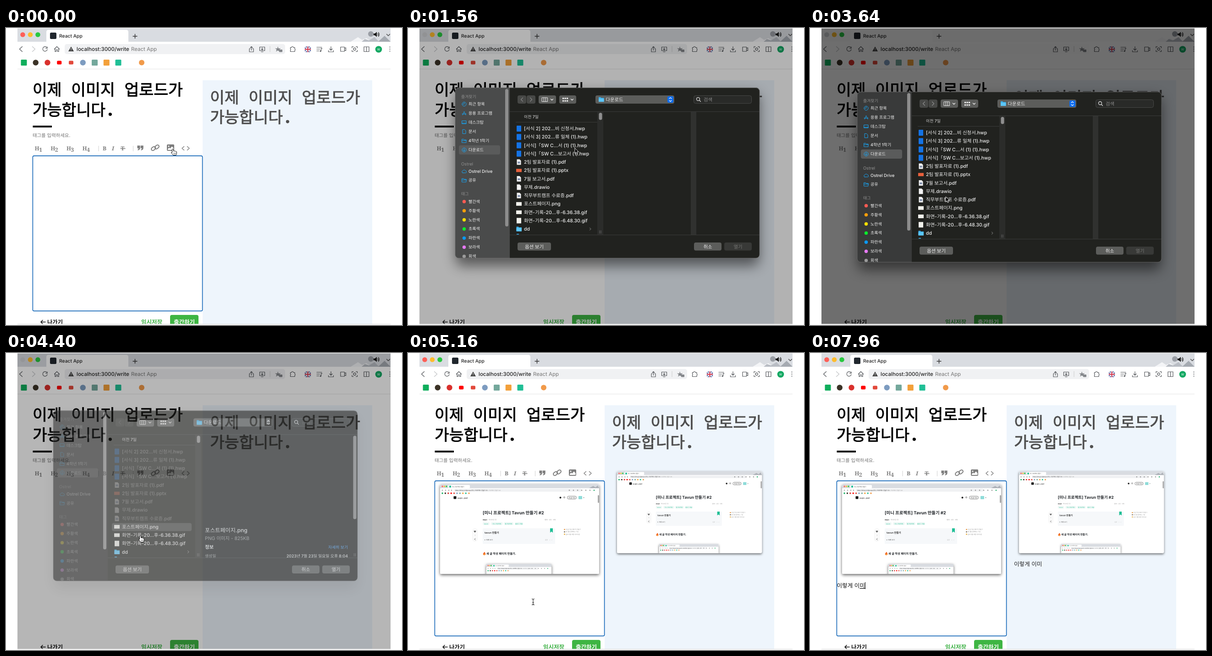
An HTML page for the animation above (8 s loop, 864 by 648 pixels).

```html
<!DOCTYPE html>
<html lang="ko">
<head>
<meta charset="utf-8">
<title>Image upload in the editor</title>
<style>
html, body { margin: 0; width: 100%; height: 100%; overflow: hidden; background: #fff; }
svg { display: block; }
text { font-family: Inter, "Noto Sans CJK KR", "Noto Sans CJK", sans-serif; white-space: pre; text-rendering: geometricPrecision; }
.ko text, text.ko { font-family: "Noto Sans CJK KR", "Noto Sans CJK", sans-serif; }
text.title { font-family: "Noto Sans Mono", "Noto Sans CJK KR", "Noto Sans CJK", monospace; stroke-width: .9px; }
.title .dot { font-weight: 700; }
.slab text { font-family: "Noto Serif", serif; font-weight: 600; }
.line { fill: none; stroke-linecap: round; stroke-linejoin: round; }
</style>
</head>
<body>
<svg id="stage" width="864" height="648" viewBox="0 0 864 648"></svg>
<script>
const rect = (x, y, w, h, fill, r = 0, more = '') =>
  `<rect x="${x}" y="${y}" width="${w}" height="${h}" rx="${r}" fill="${fill}" ${more}/>`;
const dot = (x, y, r, fill, more = '') => `<circle cx="${x}" cy="${y}" r="${r}" fill="${fill}" ${more}/>`;
const text = (x, y, s, size, fill, more = '') =>
  `<text x="${x}" y="${y}" font-size="${size}" fill="${fill}" ${more}>${s}</text>`;
const line = (d, color, w = 1.2, more = '') =>
  `<path class="line" d="${d}" stroke="${color}" stroke-width="${w}" ${more}/>`;
const shape = (d, fill, more = '') => `<path d="${d}" fill="${fill}" ${more}/>`;
const bold = 'font-weight="700"', semi = 'font-weight="600"', mid = 'text-anchor="middle"', end = 'text-anchor="end"';
const lights = ['#fe5f57', '#febc2e', '#28c840'];
const marks = ['#0fae5c', '#3b3226', '#d9302c', '#f00', '#e2493b', '#7d9cc0', '#74a89c', '#f3a03a', '#20bf96'];

function browser() {
  const ink = '#55585c';
  return rect(25, 1, 814, 645, '#fff') + rect(25, 1, 814, 29, '#d9dce1') +
    rect(25, 1, 814, 29, '#fff', 0, 'id="stripFade"') +
    shape('M752 30L768 20L777 26L786 22L798 30Z', '#f4f5f7') +
    shape('M776 30L783 24L792 27L804 20L814 30Z', '#b9bdc4') +
    shape('M812 30L826 17L839 30Z', '#a5aab1') + dot(796, 13, 6, '#9a9ea5') +
    shape('M88 30V9Q88 4 93 4H262Q267 4 267 9V30Z', '#fff') +
    lights.map((c, i) => dot(36.5 + i * 16.5, 14.5, 5.3, c, i ? '' : 'id="closeDot"')).join('') +
    rect(96, 10, 14, 14, '#20262d', 2.5) + text(116, 21, 'React App', 10.3, '#222', 'font-weight="500"') +
    line('M277 18H286M281.500 13.500V22.500', '#333', 1.4) +
    shape('M802 12H805L809 8.500V19.500L805 16H802Z', '#111') + line('M811 11.500Q813 14 811 16.500M812.500 9.500Q816 14 812.500 18.500', '#111', 1.1) +
    line('M830.500 13.500L834 17L837.500 13.500', '#444', 1.3) +
    // toolbar
    line('M35.500 40.500L29.500 46L35.500 51.500', ink) + line('M57.500 40.500L63.500 46L57.500 51.500', '#c3c5c8') +
    line('M89 42.500A5 5 0 1 0 90 47M90 41V44.500H86.500', ink) +
    line('M105.500 46L111 40.500L116.500 46M107 45V51.500H109.500V47.500H112.500V51.500H115V45', ink) +
    rect(128, 35, 481, 22, '#f0f1f3', 5, 'id="pill"') +
    shape('M142 40.500L148 51H136Z', '#444') + line('M142 44.500V47M142 49V49.100', '#fff', 1.1) +
    text(154, 50, 'localhost:3000/write', 11.5, '#222', 'font-weight="500"') + text(273, 50, 'React App', 11.5, '#777') +
    line('M533 45H531V52H540V45H538M535.500 48.500V40.500M533 43L535.500 40.500L538 43', ink) +
    line('M553.500 41.500H564.500V49.500H553.500ZM557 52H561M559 43V47.500M557 46L559 48L561 46', ink) +
    line('M576 40V52', '#ccc', 1) +
    shape('M593 40L594.500 44.500H599.500L596 47.500L597 51.500L593 49L589 51.500L590.500 47L587 44.500H592Z', '#85888c') + rect(596, 47, 7, 5.500, '#85888c', 1) +
    line('M620.500 42.500H623A2 2 0 0 1 627 42.500H630V45.500A2 2 0 0 1 630 49V51.500H620.500V48.500A2 2 0 0 0 620.500 45.500Z', ink) +
    rect(652, 40.500, 13, 12, '#27408f') + line('M652 40.500L665 52.500M665 40.500L652 52.500', '#fff', 2) +
    line('M658.500 41V52M652.500 46.500H664.500', '#fff', 3.6) + line('M658.500 41V52M652.500 46.500H664.500', '#d02840', 1.8) +
    line('M678 42H689M678 46H684.500M678 50H683M687.500 50V44L690 45', ink) + dot(686.3, 50.3, 1.6, ink) +
    line('M709 40.500V48M706 45.500L709 48.500L712 45.500M703.500 49V52H714.500V49', ink) +
    line('M730 41.500H738.500V51H730ZM738.500 44.500L741.500 43V49.500L738.500 48', ink) +
    line('M755 43.500V40.500H758M763.500 40.500H766.500V43.500M766.500 48.500V51.500H763.500M758 51.500H755V48.500', ink) + dot(760.7, 46, 2.6, 'none', `stroke="${ink}" stroke-width="1.2"`) +
    line('M781 41H792V51.500H781ZM786.500 41V51.500', ink) +
    dot(813, 46.500, 7.300, '#12a862') + text(813, 49, 'W', 6.500, '#fff', mid) +
    [41.5, 46, 50.5].map(y => dot(837.5, y, 1, ink)).join('') +
    // bookmarks
    marks.map((c, i) => {
      const x = 39 + i * 25.75;
      return [1, 2, 5].includes(i) ? dot(x, 75.5, 6.2, c) : i == 3 || i == 4 ? rect(x - 5, 71.500, 10, 8, c, 2) : rect(x - 6.5, 69, 13, 13, c, 1.5);
    }).join('') + dot(296, 75.5, 6, '#f19a4a') + rect(25, 89, 814, 1, '#e4e4e4');
}

const heading = (x, y, c) => ['이제 이미지 업로드가', '가능합니다<tspan class="dot">.</tspan>']
  .map((s, i) => text(x, y + i * 43.6, s, 34.6, c, `class="title" stroke="${c}"`)).join('');

function page() {
  const g = '#7d7d7d', b = 'class="ko" ' + bold;
  return heading(58, 147, '#000') + rect(58.5, 213, 41.5, 4, '#000') +
    text(58, 238, '태그를 입력하세요.', 10.4, '#757575', 'class="ko"') +
    '<g class="slab">' + [1, 2, 3, 4].map(n => text(28 + n * 34.7, 267, 'H', 12, g) + text(37.5 + n * 34.7, 270, n, 12, g)).join('') +
    text(211, 267, 'B', 12, g) + text(231, 267, 'I', 12, g, 'font-style="italic"') + text(250.500, 267, 'T', 12, g) + '</g>' +
    line('M250 263H260', g, 1.3) + line('M202 257.500V268.500M277.500 257.500V268.500', '#cfcfcf', 1) +
    [286.5, 293.7].map(x => shape(`M${x} 256.500h6v5q0 4.500 -5 5.500v-2q2 -.8 2 -2.500h-3z`, g)).join('') +
    [[321.7, 263], [329.300, 259.500]].map(([x, y]) =>
      rect(x - 5, y - 3.2, 10, 6.4, 'none', 3.2, `stroke="${g}" stroke-width="1.9" transform="rotate(-38 ${x} ${y})"`)).join('') +
    rect(351, 254, 16, 14, g, 2) + dot(355, 258, 1.5, '#fff') + shape('M353 266V264L356 261L358 263L362 258.500L365.500 262V266Z', '#fff') +
    line('M388.500 258.500L384 262.500L388.500 266.500M395.500 258.500L400 262.500L395.500 266.500', g, 1.5) +
    rect(429, 114, 370, 532, '#eef5fc') + heading(445, 163.5, '#4f4f4f') +
    rect(58.4, 278.9, 370.2, 338.5, 'none', 3, 'id="focus" stroke="#1467b8" stroke-width="1.6"') +
    line('M86 641.500H76M80 637.500L76 641.500L80 645.500', '#111', 1.6) + text(90, 645.5, '나가기', 12.3, '#111', b) +
    text(295, 645.5, '임시저장', 12.5, '#3bb043', b) + rect(358, 626, 62, 30, '#3eb543', 4) +
    text(366, 645.5, '출간하기', 12.5, '#fff', b);
}

// Small browser bar used inside the uploaded screenshot
const miniBar = (w, k) => `<g transform="scale(${k})">` + rect(0, 0, w / k, 9, '#d9dce1') + rect(18, 2, 47, 7, '#fff', 1.5) +
  lights.map((c, i) => dot(5 + i * 4.4, 5, 1.7, c)).join('') + rect(20, 3.5, 4, 4, '#20bf96') +
  text(26, 7, '미니 프로젝트 만들기', 3, '#333') + rect(31, 10.500, w / k - 70, 6, '#f0f1f3', 1.5) +
  text(33, 14.700, 'https://blog.io/@wupo/미니-프로젝트-만들기-2', 3.3, '#333') + text(100, 14.700, '미니 프로젝트 만들기 #2', 3.1, '#999') +
  [5, 12, 19, 25].map(x => dot(x, 13.5, 1.300, '#aaa')).join('') +
  [0, 1, 2, 3, 4, 5, 6].map(i => dot(w / k - 65 + i * 9, 13.5, 1.3, i == 6 ? '#12a862' : '#999')).join('') +
  marks.map((c, i) => dot(5 + i * 6.4, 20, 1.7, c)).join('') + dot(63, 20, 1.7, '#f19a4a') + '</g>';

function shot() {
  const teal = '#20bf96', tags = [[93, 15, 'tavun'], [111, 26, '미니 프로젝트'], [139, 21, '웹 프로젝트'], [163, 18, '블로그 개발']];
  return rect(0, 0, 347, 196, '#fff', 3, 'filter="url(#cast)"') + '<g clip-path="url(#shotClip)">' + rect(0, 0, 347, 196, '#fff') +
    miniBar(347, 1) + shape('M325 9L334 4L339 7L344 3L347 9Z', '#aeb2b9') + rect(344, 24, 3, 17, '#aaa', 1.5) +
    rect(29.5, 26.5, 6, 6, '#111', 1) + text(38, 31.500, 'wupo.pad', 4.6, '#222', 'style="font-family:\'DejaVu Sans Mono\',monospace"') +
    dot(262.5, 29.5, 2, '#222') + dot(271, 29, 1.5, 'none', 'stroke="#333" stroke-width=".6"') +
    rect(277.500, 26.300, 20, 6.400, '#fff', 3.2, 'stroke="#333" stroke-width=".6"') + text(287.500, 31, '새 글 작성', 3.5, '#222', mid) +
    rect(302, 26, 8, 7, '#8fdcd9', 1) + shape('M312 29H315L313.500 30.500Z', '#777') +
    text(93, 65.5, '[미니 프로젝트] Tavun 만들기 #2', 9.4, '#212529', bold) +
    text(93, 78.7, 'wupo', 3.6, '#222', bold) + text(104, 78.7, '· 약 6시간 전', 3.5, '#888') + text(252, 78.7, '통계 · 수정 · 삭제', 3.3, '#888', end) +
    tags.map(([x, w, s]) => rect(x, 83, w, 6.5, '#f0f8f6', 3) + text(x + w / 2, 87.5, s, 3.3, teal, mid)).join('') +
    rect(93, 96.5, 158, 34, '#f6f8fa', 1.5) + text(97, 108, 'tavun 만들기', 5.5, '#333', semi) +
    shape('M240 96.500H246V106L243 103.500L240 106Z', teal) + text(97, 123, '▾  목록 보기', 3.6, '#444') + text(229, 123, '2/2    ‹   ›', 3.6, '#aaa') +
    rect(70.5, 97, 11, 28, '#fafafa', 5.5, 'stroke="#eee" stroke-width=".6"') +
    shape('M76 106L73.500 103Q73.500 100.500 76 102Q78.500 100.500 78.500 103Z', '#666') + text(76, 112.500, '1', 3, '#777', mid) +
    line('M77.500 118.500L74.500 120.300L77.500 122', '#666', .7) +
    ['#e58a2c', '#6b5a4a', '#e5a52c'].map((c, i) => dot(271.500, 99 + i * 5.2, 1.3, c) + text(274, 100.2 + i * 5.2, ['새 글 작성 페이지 만들기', '태그를 입력하는 기능', '글쓰기를 위한 마크다운'][i], 3.2, '#888')).join('') +
    shape('M96.500 147.500Q100 151 99 154Q96.500 156.500 94 154Q93 151.500 95 150Q96.500 149 96.500 147.500Z', '#f0672a') + dot(96.600, 153.500, 1.2, '#ffc83d') +
    text(101, 154, '새 글 작성 페이지 만들기.', 6.2, '#212529', bold) +
    `<g transform="translate(101 174)">${rect(0, 0, 142, 40, '#fff', 2, 'filter="url(#cast)"')}${miniBar(142, .75)}</g></g>`;
}

const sideRows = ['최근 항목', '응용 프로그램', '데스크탑', '문서', '4학년 1학기', '다운로드'];
const sideIcons = ['M118 175a4.500 4.500 0 1 0 9 0a4.500 4.500 0 1 0 -9 0M122.500 172V175H120', 'M119 199L122.500 191L126 199M118 196.500H127',
  'M118 211.500H127V218H118ZM118 216.500H127', 'M119.500 230.500H123.500L126 233V239.500H119.500Z', 'M118 251.500H121.500L122.500 253H127V259H118ZM118 254.500H127',
  'M118 275a4.500 4.500 0 1 0 9 0a4.500 4.500 0 1 0 -9 0M122.500 272.500V277.500M120.500 275.500L122.500 277.500L124.500 275.500'];
const tagRows = [['빨간색', '#ff5b54'], ['주황색', '#ff9f0a'], ['노란색', '#ffe000'], ['초록색', '#0aec2c'], ['파란색', '#0a9aff'], ['보라색', '#e67af5'], ['회색', '#9b9b9b']];

function sidebar() {
  const cyan = '#18a4f2', w = '#f2f2f2', m = 'font-weight="500"';
  return text(116, 162, '즐겨찾기', 8.9, '#909090') + rect(111, 265, 90, 20, '#5a5b5b', 4) +
    sideRows.map((s, i) => text(132, 178.3 + i * 20, s, 9, w, m) + line(sideIcons[i], cyan, 1)).join('') +
    text(116, 309, 'Ostrel', 9.3, '#909090') + text(132, 324.5, 'Ostrel Drive', 9.3, w, m) +
    line('M119.500 325H126A2.300 2.300 0 0 0 125.500 320.500A3.300 3.300 0 0 0 119.500 320.500A2.300 2.300 0 0 0 119.500 325Z', cyan, 1) +
    text(132, 344.3, '공유', 9, w, m) + line('M118 337.500H121.500L122.500 339H127V345H118ZM118 340.500H128', cyan, 1) +
    text(116, 374.3, '태그', 8.9, '#909090') +
    tagRows.map(([s, c], i) => dot(122.5, 387.7 + i * 19.9, 3.7, c) + text(132, 390.7 + i * 19.9, s, 9, w, m)).join('');
}

const files = ['[서식 2] 202…비 신청서.hwp', '[서식 3] 202…류 일체 (1).hwp', '[서식]「SW C…서 (1) (1).hwp', '[서식]「SW C…보고서 (1).hwp',
  '2팀 발표자료 (1).pdf', '2팀 발표자료 (1).pptx', '7월 보고서.pdf', '무제.drawio', '직무부트캠프 수료증.pdf',
  '포스트페이지.png', '화면-기록-20…후-6.36.38.gif', '화면-기록-20…후-6.48.30.gif', 'dd'];
const folder = (x, y) => shape(`M${x} ${y}h4.500l1 1.500h6v8.500h-11.500z`, '#3db2ee') + rect(x, y + 3, 11.5, 7, '#5cc6f8', .8);
function fileRow(s, i) {
  const y = 228.5 + i * 18.25, ext = s.split('.').pop();
  const doc = shape(`M237.500 ${y - 6}h6l3 3v9h-9z`, '#f4f4f4');
  const icon = ext == 'hwp' ? rect(237, y - 6.5, 10, 13, '#1473e6', 1) : ext == 'pdf' ? doc + rect(239.5, y - 1, 5, 4, '#7b8aa8') :
    ext == 'drawio' ? doc : ext == 'pptx' ? rect(236, y - 3.5, 12, 7, '#e8603c') : ext == 'dd' ? folder(236.5, y - 5) :
    i == 11 ? rect(237, y - 6, 10, 12, '#f2f2ec') : rect(236, y - 4, 12, 8, '#f2f2ec');
  return icon + text(253, y + 3.7, s, 10.4, '#f0f0f0', 'font-weight="500"');
}

function sheet() {
  const btn = '#5c5d5b', w = '#efefef', m = 'font-weight="500" ';
  const button = (x, wd, s, id = '') => `<g ${id}>${rect(x, 477, wd, 17.5, btn, 4)}${text(x + wd / 2, 489.5, s, 10.4, w, m + mid)}</g>`;
  return rect(104, 152, 662, 376, '#000', 14, 'id="shade" filter="url(#soft)"') +
    '<g clip-path="url(#sheetClip)">' + rect(103, 139, 664, 372, '#21221f') + rect(103, 139, 119, 372, '#3a3b3b', 0, 'id="side"') +
    rect(212, 142, 7, 300, '#8d8d8d', 3.5) + `<g class="fade">${sidebar()}</g>` +
    rect(222, 191, 545, 1, '#3b3c3a') + rect(222, 460, 545, 1, '#3b3c3a') +
    rect(413, 192, 13, 268, '#2b2c2a') + rect(416.5, 194, 7, 15.5, '#8f8f8f', 3.5) +
    rect(617, 192, 12, 268, '#30312f', 0, 'class="idle"') +
    '<g class="fade">' + rect(239, 156, 19, 18, '#474846', 4) + rect(259, 156, 19, 18, '#474846', 4) +
    line('M250.500 161L246.500 165L250.500 169M266.500 161L270.500 165L266.500 169', '#8c8c8c') + '</g>' +
    rect(285, 156, 38, 18, btn, 4) + line('M292.500 161H304.500V169.500H292.500ZM296.500 161V169.500M300.500 161V169.500', w, 1) +
    rect(330, 156, 37, 18, btn, 4) + [0, 1, 2].map(i => rect(337 + i * 4.5, 161, 3.2, 3, w) + rect(337 + i * 4.5, 166.5, 3.2, 3, w)).join('') +
    line('M311.500 164L314 166.500L316.500 164M355.500 164L358 166.500L360.500 164', w, 1.3) +
    rect(409, 156, 172, 18, btn, 4) + folder(416, 160) + text(431.5, 168.6, '다운로드', 10.3, w, m) +
    rect(566, 158, 13, 14, '#0a6cf0', 3, 'id="stepper"') + line('M570 163L572.500 160.800L575 163M570 167L572.500 169.200L575 167', '#fff', 1.2) +
    rect(623.5, 156.500, 126, 17, '#292a28', 4, 'stroke="#484947"') + dot(633, 164, 3.500, 'none', 'stroke="#ddd" stroke-width="1.3"') + line('M635.700 166.700L638.500 169.500', '#ddd', 1.3) +
    `<g class="fade">${text(645, 168.6, '검색', 10.4, '#8a8a8a')}</g>` +
    text(253, 206, '이전 7일', 8.9, '#d5d5d5', m) + rect(235, 214, 178, 1, '#3b3c3a') +
    rect(231, 384.5, 174, 17.5, '#0a58d0', 4, 'id="pick"') +
    `<g class="fade">${files.slice(0, 9).map(fileRow).join('')}</g>` + files.slice(9).map((s, i) => fileRow(s, i + 9)).join('') +
    rect(237, 458, 5, 1.500, '#3db2ee') + line('M396.500 445L399 447.500L396.500 450', '#999', 1) + line('M418 451V457M421 451V457', '#777', .8) +
    '<g id="info" clip-path="url(#infoClip)">' + rect(757.5, 194, 7, 182, '#8d8d8d', 3.5) +
    text(434, 404.5, '포스트페이지.png', 12.1, w, m) + text(434, 421.5, 'PNG 이미지 - 825KB', 10.4, '#a5a5a5') +
    text(434, 440.7, '정보', 10.3, w, bold) + text(746, 441, '자세히 보기', 8.8, '#4aa3ff', end) +
    text(434, 459.5, '생성일', 8.8, '#b0b0b0') + text(746, 459.5, '2023년 7월 23일 일요일 오후 8:04', 8.8, w, m + end) +
    line('M759.500 451V457M762.500 451V457', '#777', .8) + '</g>' +
    button(239, 73, '옵션 보기') + button(624, 60, '취소') + button(690, 60, '열기', 'id="open"') + '</g>' +
    rect(103, 139.500, 664, 371.500, 'none', 8, 'stroke="#777" stroke-opacity=".7"');
}

const pointer = {
  arrow: shape('M0 0V11.500L2.700 9L4.500 13L6.500 12.100L4.700 8.200H8.300Z', '#000', 'stroke="#fff" stroke-width=".9"'),
  hand: shape('M-1.500 1.200Q0 -.8 1.500 1.200V5Q3 3.800 4.300 5.300Q5.800 4.500 6.700 6Q8.300 5.600 8.300 7.500V10Q8 12 7 14H.8Q-1 11.500 -3.300 9Q-4 6.800 -1.500 8Z', '#fff', 'stroke="#111" stroke-width="1"') + line('M2 9V11.500M4 9V11.500M6 9V11.500', '#111', .6),
  beam: line('M-2.500 -6.500Q0 -6.500 0 -4.500Q0 -6.500 2.500 -6.500M0 -5V5M-2.500 6.500Q0 6.500 0 4.500Q0 6.500 2.500 6.500M-1.300 1.500H1.300', '#222', 1.1)
};

const clip = (id, x, y, w, h, r = 0) => `<clipPath id="${id}">${rect(x, y, w, h, '#000', r)}</clipPath>`;
const stage = document.getElementById('stage');
stage.innerHTML = '<defs>' + clip('win', 25, 1, 814, 645) + clip('shotClip', 0, 0, 347, 196, 3) + clip('sheetClip', 103, 139, 664, 372, 8) + clip('infoClip', 426, 192, 341, 268) +
  '<filter id="soft" x="-20%" y="-20%" width="140%" height="140%"><feGaussianBlur stdDeviation="14"/></filter>' +
  '<filter id="cast" x="-10%" y="-10%" width="120%" height="125%"><feDropShadow dx="0" dy="2.500" stdDeviation="3" flood-opacity=".6"/></filter></defs>' +
  `<g clip-path="url(#win)">${browser()}${page()}
  <g id="shots"><g transform="translate(70 286)">${shot()}</g><g transform="translate(456 258) scale(.911)">${shot()}</g></g>
  <g class="ko"><text id="typed" x="58.500" y="512" font-size="12.6" fill="#111"><tspan></tspan><tspan text-decoration="underline"></tspan></text>
  ${text(445, 465, '', 12.6, '#222', 'id="echo"')}</g>
  ${rect(0, 500, 1, 15, '#000', 0, 'id="caret"')}
  ${rect(25, 1, 814, 645, '#000', 0, 'id="dim"')}<g id="sheet">${sheet()}</g></g>
  ${rect(25, 645.5, 814, 1, '#dcdcdc')}<g id="cursor">${Object.entries(pointer).map(([k, s]) => `<g data-kind="${k}">${s}</g>`).join('')}</g>`;

const $ = id => document.getElementById(id);
const set = (n, k, v) => n.setAttribute(k, v);
const show = (n, on) => set(n, 'visibility', on ? 'visible' : 'hidden');
const all = q => [...stage.querySelectorAll(q)];
const fades = all('.fade'), idles = all('.idle'), kinds = all('[data-kind]');
const [done, composing] = $('typed').children;

// Piecewise value at time t from [time, value] steps
function at(t, keys, ease = u => u) {
  if (t <= keys[0][0]) return keys[0][1];
  for (let i = 1; i < keys.length; i++) {
    const [a, v] = keys[i - 1], [b, w] = keys[i];
    if (t < b) return v + (w - v) * ease((t - a) / (b - a));
  }
  return keys[keys.length - 1][1];
}
const smooth = u => u * u * (3 - 2 * u);
const last = (t, steps) => steps.reduce((v, s) => t >= s[0] ? s : v, steps[0]);

const track = {
  focus: [[640, 1], [760, 0], [4600, 0], [4720, 1]],
  dim: [[1440, 0], [1560, .3], [1760, .57], [4280, .57], [4400, .29], [4560, 0]],
  strip: [[1600, 0], [1760, .9], [4280, .9], [4360, 0]],
  alpha: [[1460, 0], [1540, 1], [4280, 1], [4400, .55], [4520, 0]],
  drop: [[1460, -24], [1560, -9], [1720, 0], [4280, 0], [4400, -13.5], [4520, -26]],
  side: [[1560, 74], [1760, 57], [4280, 57], [4400, 42]],
  shade: [[4280, .5], [4400, .12]],
  fade: [[4280, 1], [4400, .35]],
  x: [[2050, 364], [3300, 296], [3700, 296], [3840, 293], [4520, 293], [5000, 273]],
  y: [[2050, 262], [3300, 368], [3700, 368], [3840, 391], [4280, 391], [4400, 397], [4520, 397], [5000, 543]]
};
const typing = [[0, '', ''], [5920, '', 'ㅇ'], [6080, '', '이'], [6240, '', '일'], [6360, '이', '러'], [6520, '이', '렇'],
  [6760, '이렇', 'ㄱ'], [6920, '이렇', '게'], [7160, '이렇게 ', ''], [7360, '이렇게 ', 'ㅇ'], [7560, '이렇게 ', '이'], [7720, '이렇게 ', '임'], [7920, '이렇게 이', '미']];
const kindAt = [[0, 'hand'], [700, 'arrow'], [4320, 'hand'], [4600, 'arrow'], [4900, 'beam'], [5400, '']];

function draw(t) {
  const v = k => at(t, track[k]), strip = v('strip'), picked = t >= 3880, closing = t >= 4280, gray = v('side');
  set($('focus'), 'opacity', v('focus'));
  set($('dim'), 'opacity', v('dim'));
  set($('stripFade'), 'opacity', strip);
  set($('pill'), 'opacity', 1 - strip);
  set($('closeDot'), 'fill', t >= 1500 && t < 4560 ? '#cfd1d4' : lights[0]);
  set($('sheet'), 'opacity', v('alpha'));
  set($('sheet'), 'transform', `translate(0 ${v('drop')})`);
  set($('shade'), 'opacity', v('shade'));
  set($('side'), 'fill', `rgb(${gray},${gray + 1},${gray + 1})`);
  fades.forEach(n => set(n, 'opacity', v('fade')));
  set($('stepper'), 'fill', closing ? '#5c5d5b' : '#0a6cf0');
  set($('pick'), 'fill', closing ? '#444543' : '#0a58d0');
  show($('pick'), picked);
  show($('info'), picked);
  idles.forEach(n => show(n, !picked));
  set($('open'), 'opacity', picked ? 1 : .4);
  show($('shots'), t >= 4840);

  const [, a, b] = last(t, typing);
  done.textContent = a;
  composing.textContent = b;
  $('echo').textContent = a + b;
  set($('caret'), 'x', 58.5 + $('typed').getComputedTextLength());
  show($('caret'), t >= 5400);

  const kind = last(t, kindAt)[1];
  kinds.forEach(n => show(n, n.dataset.kind == kind));
  set($('cursor'), 'transform', `translate(${at(t, track.x, smooth)} ${at(t, track.y, smooth) + (kind == 'hand' ? 1.5 : 0)})`);
}

const start = performance.now();
function tick() {
  draw((performance.now() - start) % 8000);
  requestAnimationFrame(tick);
}
tick();
</script>
</body>
</html>
```
